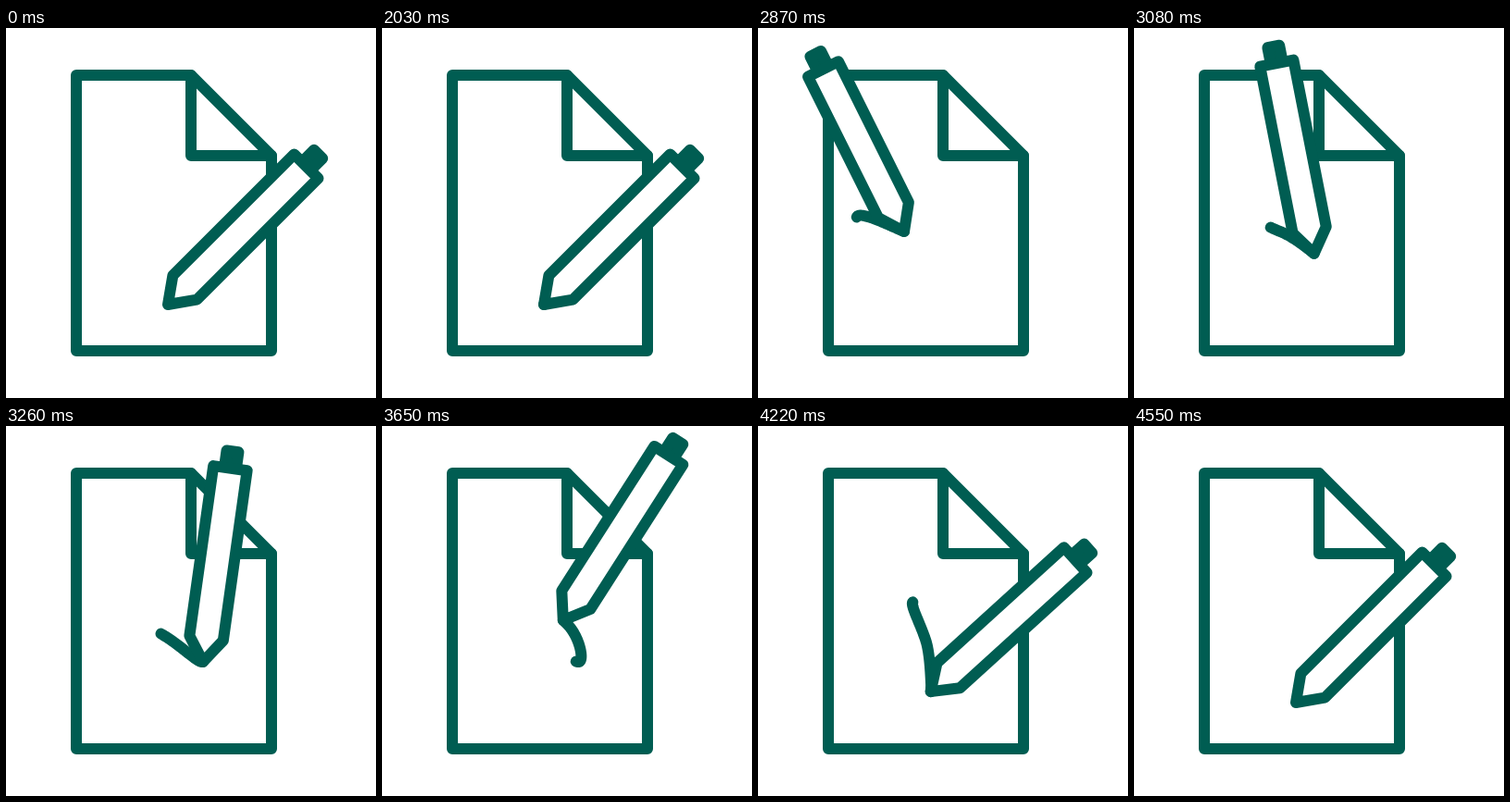
An HTML page with a canvas for the animation above (4580 ms loop, 400x400 px).

```html
<!DOCTYPE html>
<html lang="en">
<head>
<meta charset="utf-8">
<title>Writing pen</title>
<style>
  html, body { margin: 0; width: 100%; height: 100%; overflow: hidden; background: #fff; }
  canvas { display: block; width: 100vmin; height: 100vmin; }
</style>
</head>
<body>
<canvas id="stage" width="400" height="400"></canvas>
<script>
const LOOP = 4580, START = 2030, DRAIN = 4010, END = 4550, STEP = 30;
const INK_LENGTH = 55, GREEN = '#005d52';
const ctx = document.getElementById('stage').getContext('2d');

// Turning points of the stroke: time, tip x, tip y, tilt in degrees
const STROKE = [
  [START, 175, 299, 45],
  [2390, 129, 274, 10.9],
  [2540, 109, 219, -9.5],
  [2640, 107, 204, -15.4],
  [2870, 158, 220, -26.5],
  [3260, 213, 255, 8],
  [3620, 200, 214, 31],
  [3830, 167, 191, 41.5],
  [DRAIN, 183, 238, 48],
  [4160, 187, 277, 48],
  [END, 175, 299, 45]
];

// Velocity at a key, weighted by its neighbouring intervals; at rest at both ends
function velocity(i, c) {
  const p = STROKE[i - 1], k = STROKE[i], n = STROKE[i + 1];
  if (!p || !n) return 0;
  const before = k[0] - p[0], after = n[0] - k[0];
  return ((k[c] - p[c]) / before * after + (n[c] - k[c]) / after * before) / (before + after);
}

function pose(t) {
  const next = STROKE.findIndex(key => key[0] > t);
  if (next <= 0) return STROKE[0].slice(1);
  const a = STROKE[next - 1], b = STROKE[next];
  const span = b[0] - a[0], u = (t - a[0]) / span;
  return [1, 2, 3].map(c =>
    a[c] + (b[c] - a[c]) * u * u * (3 - 2 * u)
      + span * u * (1 - u) * ((1 - u) * velocity(next - 1, c) - u * velocity(next, c)));
}

// The moment on the stroke where the visible ink begins
function inkStart(t) {
  if (t > DRAIN) {
    const held = inkStart(DRAIN);
    return held + (END - held) * ((t - DRAIN) / (END - DRAIN)) ** 3;
  }
  let from = t, length = 0, [x, y] = pose(t);
  while (from > START && length < INK_LENGTH) {
    from -= 5;
    const [px, py] = pose(from);
    length += Math.hypot(px - x, py - y);
    [x, y] = [px, py];
  }
  return from;
}

function shape(points, closed, fill) {
  ctx.beginPath();
  for (const [x, y] of points) ctx.lineTo(x, y);
  if (closed) ctx.closePath();
  if (fill) {
    ctx.fillStyle = fill;
    ctx.fill();
  }
  ctx.stroke();
}

function drawPage() {
  shape([[76, 51], [200, 51], [287, 138], [287, 349], [76, 349]], true);
  shape([[200, 51], [200, 138], [287, 138]], false);
}

function drawInk(t) {
  const points = [];
  for (let time = inkStart(t); time < t; time += 5) points.push(pose(time));
  points.push(pose(t));
  shape(points, false);
}

function drawPen([x, y, tilt], length) {
  const angle = tilt * Math.PI / 180, cos = Math.cos(angle), sin = Math.sin(angle);
  const place = ([side, along]) => [
    x + side * cos + along * sin,
    y + side * sin - along * cos
  ];
  const nose = 26, half = 18.4, knob = 6.5;
  const cap = [[-knob, length], [-knob, length + 18.5], [knob, length + 18.5], [knob, length]];
  const body = [[0, 0], [-half, nose], [-half, length], [half, length], [half, nose]];
  shape(cap.map(place), true, GREEN);
  shape(body.map(place), true, '#fff');
}

function draw(now) {
  const elapsed = now % LOOP;
  const moving = elapsed >= START && elapsed < END;
  const t = moving ? START + Math.floor((elapsed - START) / STEP) * STEP : START;
  const foreshortening = 30 * Math.exp(-(((t - 2665) / 250) ** 2));
  ctx.fillStyle = '#fff';
  ctx.fillRect(0, 0, 400, 400);
  ctx.strokeStyle = GREEN;
  ctx.lineWidth = 12;
  ctx.lineCap = ctx.lineJoin = 'round';
  drawPage();
  if (moving) drawInk(t);
  drawPen(pose(t), 211.5 - foreshortening);
}

const begin = performance.now();
function tick() {
  draw(performance.now() - begin);
  requestAnimationFrame(tick);
}
tick();
</script>
</body>
</html>
```
